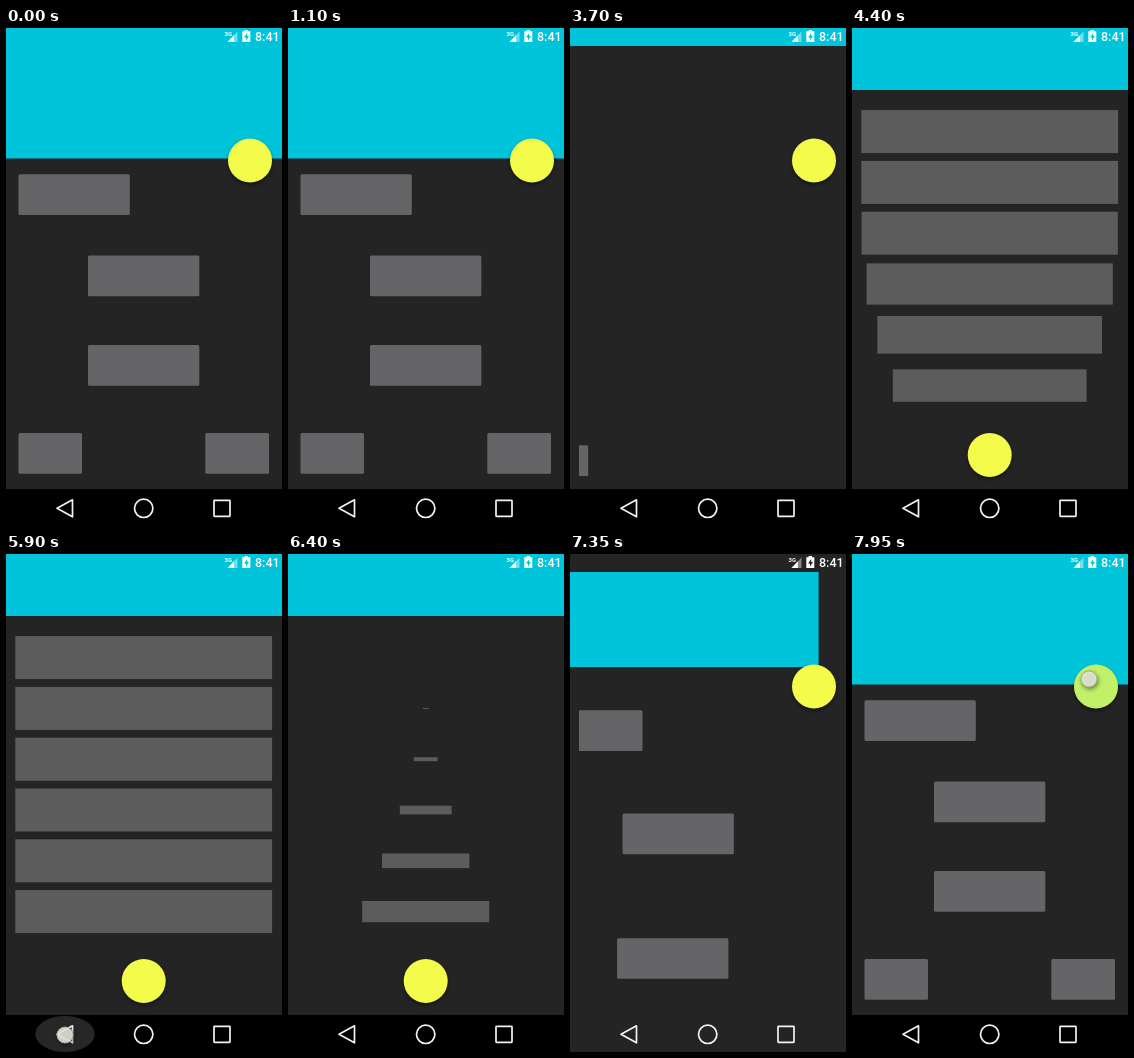
Recreate the animation shown at these times as an HTML page. Size 276 by 498 pixels, loop 8 s.

```html
<!DOCTYPE html>
<html lang="en">
<head>
<meta charset="utf-8">
<title>Screen transition</title>
<style>
  html, body { margin: 0; width: 100%; height: 100%; overflow: hidden; background: #242424; }
  svg { display: block; width: 100%; height: 100%; }
  text { font-family: Roboto, "Open Sans", sans-serif; fill: #fff; }
</style>
</head>
<body>
<svg viewBox="0 0 276 498">
  <defs>
    <clipPath id="content"><rect y="18" width="276" height="480"/></clipPath>
    <clipPath id="padded"><rect x="9" y="18" width="258" height="430"/></clipPath>
    <clipPath id="disc"><circle r="22"/></clipPath>
    <filter id="soft" x="-50%" y="-50%" width="200%" height="200%"><feGaussianBlur stdDeviation="2"/></filter>
  </defs>
  <rect width="276" height="498" fill="#242424"/>

  <g clip-path="url(#content)">
    <rect id="header" y="17" width="276" height="113.5" fill="#00c4da"/>
  </g>
  <g id="boxes" clip-path="url(#padded)" fill="#656567"></g>

  <rect id="bar" y="18" width="276" height="44" fill="#00c4da"/>
  <g id="rows" fill="#5b5c5b"></g>

  <rect id="status" width="276" height="18" fill="#00c4da"/>
  <rect id="nav" y="461" width="276" height="37" fill="#000"/>

  <g fill="#fff">
    <path d="M221.5 14L231.5 3.5V14Z" opacity=".45"/>
    <path d="M221.5 14L228 7.2V14Z"/>
    <text x="218.6" y="7.6" font-size="6" font-weight="700">3G</text>
    <path fill-rule="evenodd" d="M238.6 3.2V2H242V3.2H244.3V14H236.3V3.2ZM241.2 5L238 9.4H240V12.4L243 8H241.2Z"/>
    <text x="249" y="13.2" font-size="12.5" font-weight="500">8:41</text>
  </g>

  <ellipse id="glow" cx="59" cy="480" ry="18" fill="#fff"/>
  <g fill="none" stroke="#f2f2f2" stroke-width="1.7" stroke-linejoin="round">
    <path d="M51 480.3L66.5 471.8V488.8Z"/>
    <circle cx="137.7" cy="480.3" r="9.2"/>
    <rect x="208" y="472.3" width="16" height="16" rx=".5"/>
  </g>

  <g id="fab">
    <circle cy="2.2" r="21.5" fill="#000" opacity=".5" filter="url(#soft)"/>
    <circle r="22" fill="#f3fc4a"/>
    <circle id="ripple" fill="#00c4da" clip-path="none"/>
  </g>

  <g id="touch">
    <circle cx="1" cy="2" r="8.5" fill="#000" opacity=".45" filter="url(#soft)"/>
    <circle r="8" fill="#e6e9dc" fill-opacity=".88" stroke="#a9ac9c" stroke-width="1"/>
  </g>
</svg>
<script>
const LOOP = 8000, SPAN = 350, REACH = 440, LAG = 0.476;
const HOME = [244, 132.5], DOCK = [137.7, 427];
const FIRST = 3339, BACK = 7098;
const $ = id => document.getElementById(id);
const clamp = v => Math.min(1, Math.max(0, v));
const part = (t, from, len) => clamp((t - from) / len);
const smooth = u => (1 - Math.cos(Math.PI * u)) / 2;

function add(parent, name, attrs) {
  const el = document.createElementNS("http://www.w3.org/2000/svg", name);
  for (const k in attrs) el.setAttribute(k, attrs[k]);
  parent.append(el);
  return el;
}
const move = (el, x, y, s = 1) => el.setAttribute("transform", `translate(${x} ${y}) scale(${s})`);
const fade = (el, v) => el.setAttribute("opacity", v);

// Pieces that fly away from the round button: element and centre
const pieces = [[$("header"), 138, 65]];
const boxes = [[12.5, 146.3, 111.3], [82, 227.5, 111.3], [82, 317, 111.3], [12.5, 405, 63.5], [199.3, 405, 63.7]];
for (const [x, y, w] of boxes) {
  const el = add($("boxes"), "rect", { x, y, width: w, height: 40.7, rx: 1.5 });
  pieces.push([el, x + w / 2, y + 20.3]);
}
const bars = [[$("status"), 138, 9], [$("nav"), 138, 480]];
const rows = Array.from({ length: 6 }, () =>
  add($("rows"), "rect", { x: -128.4, y: -21.5, width: 256.8, height: 43 }));

function explode([el, cx, cy], t) {
  const dx = cx - HOME[0], dy = cy - HOME[1], d = Math.hypot(dx, dy);
  let k;
  if (t < 5000) {
    k = part(t, FIRST + LAG * (354 - d), SPAN) ** 2;
  } else {
    const late = t < 7350 ? t : 7350 + (t - 7350) * 3.2;
    k = (1 - part(late, BACK + Math.min(LAG * (d - 125), 55), SPAN)) ** 2;
  }
  move(el, dx / d * REACH * k, dy / d * REACH * k);
}

// Arc between the two resting places of the button
function arc(u) {
  const v = 1 - u, a = v * v * v, b = 3 * v * v * u, c = 3 * v * u * u, d = u * u * u;
  return [
    a * HOME[0] + b * HOME[0] + c * 191 + d * DOCK[0],
    a * HOME[1] + b * 215 + c * 363 + d * DOCK[1]
  ];
}

const taps = [
  { x: 251, y: 149, on: 2700, off: 3080, wave: 2830, end: 3020 },
  { x: 59, y: 481, on: 5750, off: 6020, wave: 5750, end: 5920, back: true },
  { x: 237, y: 125, on: 7690, off: 9000, wave: 7690, end: 9000 }
];

function drawTaps(t) {
  const touch = $("touch"), ripple = $("ripple"), glow = $("glow");
  fade(touch, 0);
  fade(ripple, 0);
  fade(glow, 0);
  for (const p of taps) {
    if (t < p.on || t > p.off + 200) continue;
    move(touch, p.x, p.y);
    fade(touch, 1 - part(t, p.off, 100));
    const grow = part(t, p.wave, 200), left = 1 - part(t, p.end, 180);
    if (p.back) {
      glow.setAttribute("rx", 10 + 26 * grow);
      fade(glow, 0.2 * left * grow);
    } else {
      // The wave drifts to the centre while it fills the disc
      ripple.setAttribute("cx", (p.x - HOME[0]) * (1 - grow));
      ripple.setAttribute("cy", (p.y - HOME[1]) * (1 - grow));
      ripple.setAttribute("r", 22 * grow);
      fade(ripple, 0.21 * left);
    }
  }
}

function draw(t) {
  for (const p of pieces) explode(p, t);
  for (const p of bars) {
    if (t >= BACK) explode(p, t);
    else move(p[0], 0, 0);
  }

  fade($("bar"), part(t, 3710, 320) * (1 - part(t, 6590, 350)));
  rows.forEach((el, i) => {
    const s = smooth(part(t, 4050 + 30 * i, 300)) * (1 - smooth(part(t, 6100 + 30 * i, 300)));
    move(el, 137.7, 103.6 + 50.8 * i, s);
  });

  const u = smooth(part(t, 3700, 350)) * (1 - smooth(part(t, 6680, 380)));
  move($("fab"), ...arc(u));
  drawTaps(t);
}

$("ripple").parentNode.setAttribute("clip-path", "none");
const wrap = add($("fab"), "g", { "clip-path": "url(#disc)" });
wrap.append($("ripple"));

const start = performance.now();
function tick() {
  draw((performance.now() - start) % LOOP);
  requestAnimationFrame(tick);
}
tick();
</script>
</body>
</html>
```
